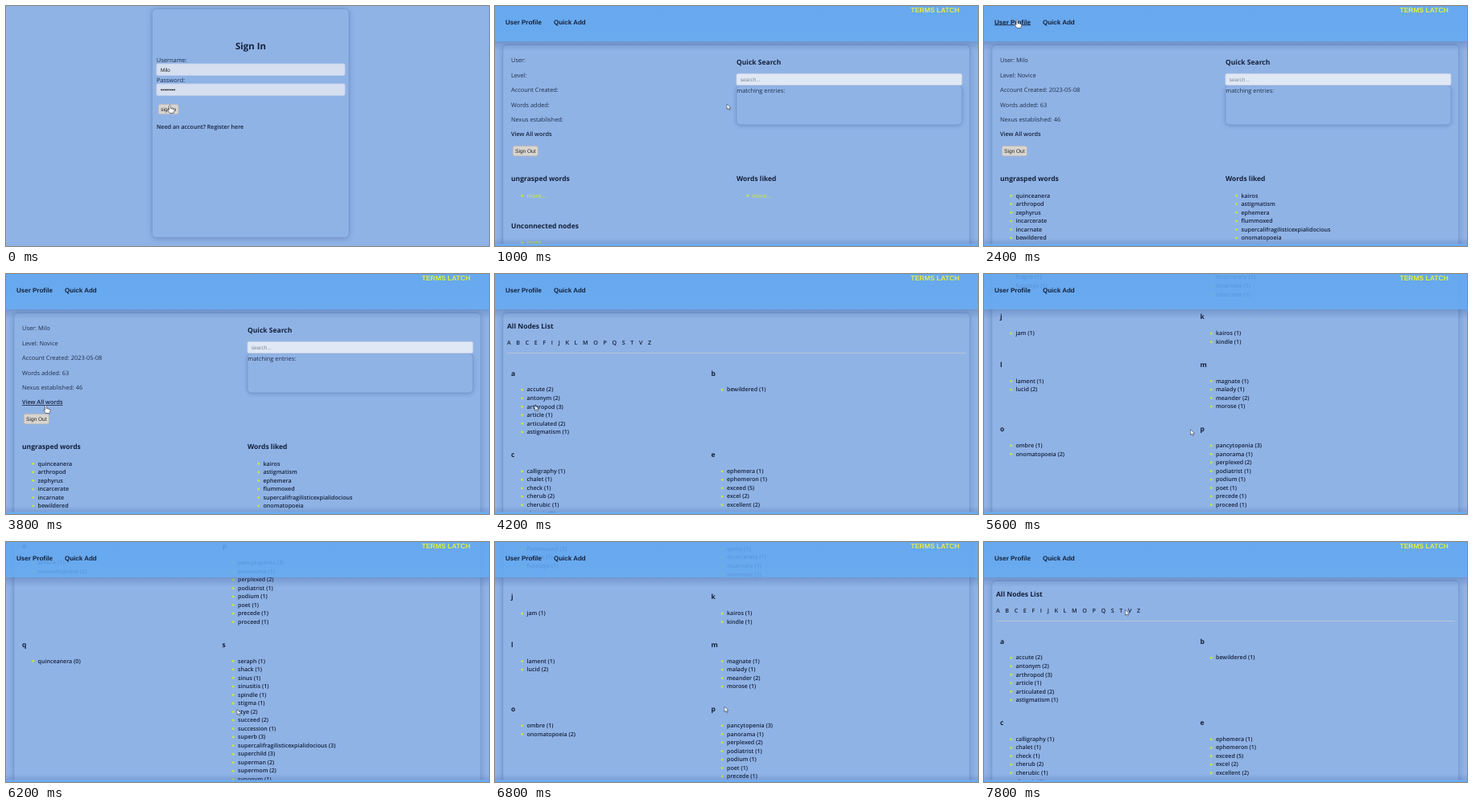
An HTML page with a canvas that plays this animation: 600 by 299 pixels, repeating every 8 s.

```html
<!DOCTYPE html>
<html lang="en">
<head>
<meta charset="utf-8">
<title>Word list app</title>
<style>
html, body { margin: 0; width: 100%; height: 100%; overflow: hidden; background: #90b3e6; }
canvas { display: block; }
</style>
</head>
<body>
<canvas id="stage" width="600" height="299"></canvas>
<script>
const ctx = document.getElementById('stage').getContext('2d');
const W = 600, H = 299, LOOP = 8000, STEP = 200;
const BG = '#90b3e6', INK = '#1f2f49', DARK = '#14213a', LIME = '#c3e34c';
const BODY = '7.4px "Open Sans", sans-serif';
const SEMI = '600 7.1px "Open Sans", sans-serif';
const HEAD = '700 8.5px "Open Sans", sans-serif';
const FORM = '6.55px "Liberation Sans", Arial, sans-serif';
const NAV = '700 8px "Liberation Sans", Arial, sans-serif';
const LINE = 10.53;

// [time, x, y] of the pointer tip
const POINTER = [
  [0, 203.5, 123.5], [600, 205, 124], [1000, 288, 122], [1400, 270, 112],
  [2200, 41, 17.5], [2800, 41, 17.5], [3600, 49.5, 163.5], [4200, 49.5, 163.5],
  [4800, 250, 190], [5400, 251, 191], [6200, 287, 208.5], [6800, 285, 205],
  [7600, 178, 88], [7800, 175.5, 84.5], [8000, 175.5, 84.5]
];
// [time, scroll offset]
const SCROLL = [
  [0, 0], [4800, 0], [5000, 197], [6200, 573], [6600, 740], [7000, 0], [8000, 0]
];

const UNGRASPED = 'quinceanera arthropod zephyrus incarcerate incarnate bewildered ephemera'.split(' ');
const LIKED = 'kairos astigmatism ephemera flummoxed supercalifragilisticexpialidocious onomatopoeia seraph'.split(' ');
const NODES = {
  a: 'accute 2 antonym 2 arthropod 3 article 1 articulated 2 astigmatism 1',
  b: 'bewildered 1',
  c: 'calligraphy 1 chalet 1 check 1 cherub 2 cherubic 1 chronic 1 chronos 1 complex 1 cytology 1',
  e: 'ephemera 1 ephemeron 1 exceed 5 excel 2 excellent 2',
  f: 'flummoxed 2 fragile 1 fuselage 1',
  i: 'ignite 1 incarcerate 1 incarnate 1 intercede 1',
  j: 'jam 1',
  k: 'kairos 1 kindle 1',
  l: 'lament 1 lucid 2',
  m: 'magnate 1 malady 1 meander 2 morose 1',
  o: 'ombre 1 onomatopoeia 2',
  p: 'pancytopenia 3 panorama 1 perplexed 2 podiatrist 1 podium 1 poet 1 precede 1 proceed 1',
  q: 'quinceanera 0',
  s: 'seraph 1 shack 1 sinus 1 sinusitis 1 spindle 1 stigma 1 stye 2 succeed 2 succession 1 ' +
     'superb 3 supercalifragilisticexpialidocious 3 superchild 3 superman 2 supermom 2 synonym 1',
  t: 'tangent 1 terse 1 tirade 2',
  v: 'vapid 1 verbose 2',
  z: 'zephyrus 0'
};
const GROUPS = Object.entries(NODES).map(([letter, list]) => ({
  letter,
  words: list.match(/\S+ \d/g).map(w => w.replace(/ (\d)/, ' ($1)'))
}));

let tip, hand;

function track(keys, t, ease) {
  const i = Math.max(1, keys.findIndex(k => k[0] > t));
  const a = keys[i - 1], b = keys[i];
  const u = ease((t - a[0]) / (b[0] - a[0]));
  return a.slice(1).map((v, n) => v + (b[n + 1] - v) * u);
}
const smooth = u => u * u * (3 - 2 * u);
const linear = u => u;

// y is the middle of the capitals
function text(s, x, y, font = BODY, color = INK, align = 'left') {
  ctx.font = font;
  ctx.fillStyle = color;
  ctx.textAlign = align;
  ctx.fillText(s, x, y + parseFloat(font.match(/[\d.]+px/)[0]) * 0.36);
}

function hover(x, y, w, h) {
  const hit = tip[0] >= x && tip[0] <= x + w && tip[1] >= y && tip[1] <= y + h;
  hand = hand || hit;
  return hit;
}

function link(s, x, y, font) {
  text(s, x, y, font, DARK);
  const w = ctx.measureText(s).width;
  if (hover(x - 2, y - 5, w + 4, 10)) ctx.fillRect(x, y + 3.6, w, 0.8);
  return w;
}

function box(x, y, w, h, r, fill, stroke) {
  ctx.beginPath();
  ctx.roundRect(x, y, w, h, r);
  ctx.fillStyle = fill;
  ctx.fill();
  ctx.shadowColor = 'transparent';
  ctx.strokeStyle = stroke;
  ctx.lineWidth = 0.8;
  ctx.stroke();
}

function panel(x, y, w, h, blur = 9) {
  ctx.save();
  ctx.shadowColor = 'rgba(50,80,140,.38)';
  ctx.shadowBlur = blur;
  ctx.shadowOffsetY = 1;
  box(x, y, w, h, 5, BG, '#7897c9');
  ctx.restore();
}

function button(s, x, y, w, h) {
  box(x, y, w, h, 2.5, '#d8d5d1', '#b5b2b3');
  text(s, x + w / 2, y + h / 2, FORM, '#222', 'center');
}

function input(x, y, w, h, fill) {
  box(x, y, w, h, 2, fill, '#c4d1e8');
}

function shade(y0, y1, from, to) {
  const g = ctx.createLinearGradient(0, y0, 0, y1);
  g.addColorStop(0, from);
  g.addColorStop(1, to);
  ctx.fillStyle = g;
  ctx.fillRect(0, y0, W, y1 - y0);
}

function bullet(x, y) {
  ctx.fillStyle = LIME;
  ctx.beginPath();
  ctx.arc(x, y, 1.5, 0, 7);
  ctx.fill();
}

function list(title, words, x, y, gap, color = DARK) {
  text(title, x, y, HEAD, DARK);
  words.forEach((w, i) => {
    const row = y + gap + i * LINE;
    bullet(x + 13.7, row + 0.3);
    text(w, x + 19.5, row, SEMI, color);
  });
}

function signIn() {
  panel(181.5, 3.5, 244.5, 285, 7);
  text('Sign In', 304, 49.5, '700 11.4px "Open Sans", sans-serif', DARK, 'center');
  text('Username:', 187, 67.5);
  text('Password:', 187, 92.5);
  input(187, 72, 234, 14.5, '#d5dff0');
  input(187, 97, 234, 14.5, '#d5dff0');
  text('Milo', 192, 79.3, FORM, '#222');
  ctx.fillStyle = '#222';
  for (let i = 0; i < 8; i++) {
    ctx.beginPath();
    ctx.arc(193.2 + i * 2.3, 104.4, 0.95, 0, 7);
    ctx.fill();
  }
  button('sign in', 189.3, 122.4, 25, 12.4);
  hover(189, 122, 26, 13);
  text('Need an account? Register here', 187, 150.7, SEMI, DARK);
}

function profile(loaded) {
  panel(9.8, 48.5, 580, 400);
  const facts = [['User:', 'Milo'], ['Level:', 'Novice'], ['Account Created:', '2023-05-08'],
    ['Words added:', '63'], ['Nexus established:', '46']];
  facts.forEach(([k, v], i) => text(loaded ? k + ' ' + v : k, 20, 67.7 + i * 18.4));
  link('View All words', 20, 159.6, '600 7.25px "Open Sans", sans-serif');
  button('Sign Out', 22.2, 174.3, 31.2, 12.6);

  text('Quick Search', 300, 70, HEAD, DARK);
  panel(300, 99, 280, 49, 6);
  input(300, 84.3, 280, 14.4, '#e0e8f5');
  text('search...', 304.7, 91.8, FORM, '#7f8796');
  text('matching entries:', 300.3, 105.3);

  const more = ['more...'], color = loaded ? DARK : LIME;
  list('ungrasped words', loaded ? UNGRASPED : more, 20, 215, 21, color);
  list('Words liked', loaded ? LIKED : more, 300, 215, 21, color);
  if (!loaded) list('Unconnected nodes', more, 20, 273.5, 21, color);
}

function allNodes(scroll) {
  ctx.save();
  ctx.translate(0, -scroll);
  panel(9.8, 48.5, 580, 990);
  text('All Nodes List', 15, 65, HEAD, DARK);
  let x = 15;
  for (const g of GROUPS) x += link(g.letter.toUpperCase(), x, 85.2, SEMI) + 6.65;
  ctx.fillStyle = '#b8c9cf';
  ctx.fillRect(15, 98, 570, 0.9);
  let y = 123.5;
  for (let i = 0; i < GROUPS.length; i += 2) {
    const pair = GROUPS.slice(i, i + 2);
    pair.forEach((g, n) => list(g.letter, g.words, 20 + n * 248.5, y, 20.4));
    y += 48.8 + (Math.max(...pair.map(g => g.words.length)) - 1) * LINE;
  }
  ctx.restore();
}

function chrome() {
  shade(44, 56, 'rgba(50,85,150,.3)', 'rgba(50,85,150,0)');
  shade(0, 44, 'rgba(97,167,240,.88)', 'rgba(101,169,240,.88)');
  link('User Profile', 13, 19.8, NAV);
  link('Quick Add', 73, 19.8, NAV);
  text('TERMS LATCH', 516.5, 5, '700 8.5px "Liberation Sans", Arial, sans-serif', '#e3f03c');
  shade(289, 296.5, 'rgba(50,85,150,0)', 'rgba(50,85,150,.22)');
  ctx.fillStyle = '#6aabf1';
  ctx.fillRect(0, 296.5, W, 3);
}

function pointer() {
  const shape = hand
    ? 'M-1 1Q0-1 1 1V4L5 5Q6 5 5.6 7L4.6 10H0L-3 6Q-3 4.6-1 6Z'
    : 'M0 0V8L2 6.3L3.4 9.2L4.7 8.6L3.4 5.8H6Z';
  ctx.save();
  ctx.translate(...tip);
  if (!hand) ctx.scale(0.85, 0.85);
  const path = new Path2D(shape);
  ctx.fillStyle = '#fff';
  ctx.strokeStyle = '#343b4a';
  ctx.lineWidth = 0.7;
  ctx.lineJoin = 'round';
  ctx.fill(path);
  ctx.stroke(path);
  ctx.restore();
}

function draw(now) {
  const t = Math.floor((now % LOOP) / STEP) * STEP;
  tip = track(POINTER, t, smooth);
  hand = false;
  ctx.textRendering = 'geometricPrecision';
  ctx.fillStyle = BG;
  ctx.fillRect(0, 0, W, H);
  if (t < 600) signIn();
  else {
    if (t < 4200) profile(t >= 1400);
    else allNodes(track(SCROLL, t, linear)[0]);
    chrome();
  }
  pointer();
}

const start = performance.now();
function tick() {
  draw(performance.now() - start);
  requestAnimationFrame(tick);
}
tick();
</script>
</body>
</html>
```
